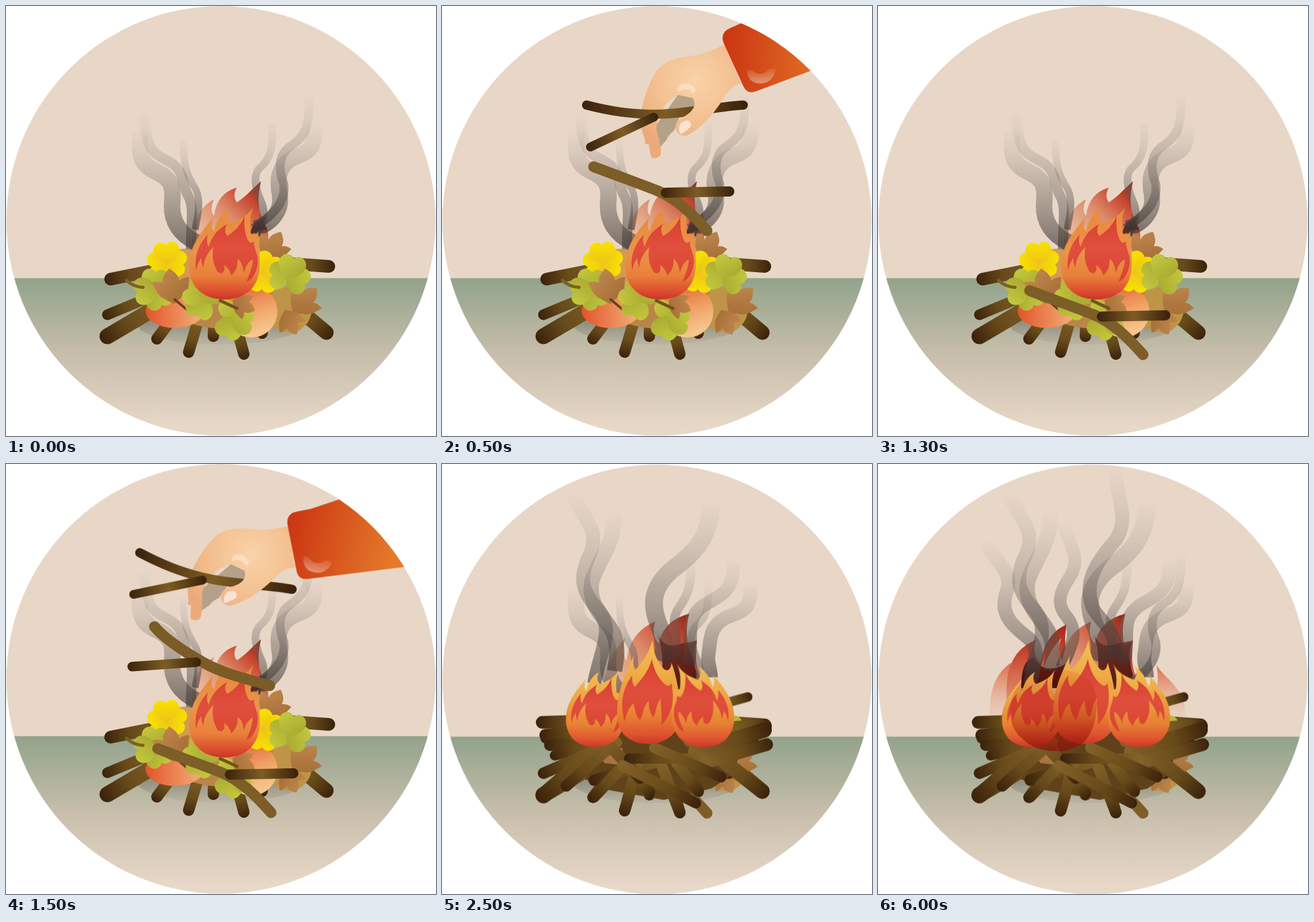
These frames come from a looping animation (678x677 px, 8000 ms). An HTML page:

```html
<!DOCTYPE html>
<html lang="en">
<head>
<meta charset="utf-8">
<title>Campfire</title>
<style>
html, body { margin: 0; width: 100%; height: 100%; overflow: hidden; background: #fff; }
svg { display: block; width: 678px; height: 677px; }
.scene, .early, .late, .mid, .first, .last, .hand, .s1, .s2 { animation: 8s step-end infinite; }
.scene { animation-name: nudge; }
.early { animation-name: early; }
.first { animation-name: first; }
.late { animation-name: late; }
.mid { animation-name: mid; }
.last { animation-name: last; }
.hand { animation-name: hand; }
.s1 { animation-name: drop1; }
.s2 { animation-name: drop2; }
@keyframes nudge { 0% { transform: none } 25%, 100% { transform: translateY(.8px) } }
@keyframes early { 0% { opacity: 1 } 31.25%, 100% { opacity: 0 } }
@keyframes first { 0% { opacity: 1 } 37.5%, 100% { opacity: 0 } }
@keyframes late { 0% { opacity: 0 } 31.25%, 100% { opacity: 1 } }
@keyframes mid { 0% { opacity: 1 } 31.25% { opacity: 0 } 37.5%, 100% { opacity: 1 } }
@keyframes last { 0% { opacity: 0 } 37.5%, 100% { opacity: 1 } }
@keyframes hand {
  0% { opacity: 0; transform: none }
  6.25% { opacity: 1; transform: none }
  12.5% { opacity: 0; transform: none }
  18.75% { opacity: 1; transform: translate(331px, 168.5px) rotate(13.5deg) translate(-351.5px, -156px) }
  25%, 100% { opacity: 0; transform: none }
}
@keyframes drop1 {
  0% { opacity: 0; transform: none }
  6.25% { opacity: 1; transform: translateY(-195px) }
  12.5%, 100% { opacity: 1; transform: none }
}
@keyframes drop2 {
  0% { opacity: 0; transform: none }
  18.75% { opacity: 1; transform: translateY(-136px) }
  25%, 100% { opacity: 1; transform: none }
}
.smoke path { fill: none; stroke: url(#haze); stroke-linejoin: round; }
</style>
</head>
<body>
<svg viewBox="0 0 678 677">
<defs>
  <clipPath id="disc"><circle cx="339" cy="338.3" r="338.3"/></clipPath>
  <linearGradient id="ground" x2="0" y2="1"><stop stop-color="#92a38b"/><stop offset=".5" stop-color="#c9bfac"/><stop offset=".95" stop-color="#e8d8c8"/></linearGradient>
  <linearGradient id="shade" x2="0" y2="1"><stop offset=".5" stop-color="#77756a" stop-opacity=".9"/><stop offset="1" stop-color="#b5aa9a" stop-opacity=".7"/></linearGradient>
  <linearGradient id="bark"><stop stop-color="#3a210b"/><stop offset=".4" stop-color="#674a1a"/><stop offset="1" stop-color="#836329"/></linearGradient>
  <linearGradient id="twig"><stop stop-color="#3a210b"/><stop offset=".5" stop-color="#7d5c24"/><stop offset="1" stop-color="#38200a"/></linearGradient>
  <linearGradient id="held" gradientUnits="userSpaceOnUse" x1="221" x2="482"><stop stop-color="#3a210b"/><stop offset=".5" stop-color="#7d5c24"/><stop offset="1" stop-color="#38200a"/></linearGradient>
  <linearGradient id="warm" x2="0" y2="1"><stop stop-color="#e9873c"/><stop offset=".5" stop-color="#eb9348"/><stop offset=".75" stop-color="#e9813a"/><stop offset=".92" stop-color="#dc4c2e"/><stop offset="1" stop-color="#c9352a"/></linearGradient>
  <linearGradient id="gold" x2="0" y2="1"><stop stop-color="#f3c155"/><stop offset=".35" stop-color="#efaa46"/><stop offset=".72" stop-color="#e88233"/><stop offset=".9" stop-color="#df5630"/><stop offset="1" stop-color="#cd382a"/></linearGradient>
  <linearGradient id="red" x2="0" y2="1"><stop stop-color="#d83f31"/><stop offset=".5" stop-color="#e04f3d"/><stop offset="1" stop-color="#d8452f"/></linearGradient>
  <linearGradient id="back" x1="1" y1="0" x2=".25" y2=".75"><stop stop-color="#701711"/><stop offset=".32" stop-color="#c94831"/><stop offset=".62" stop-color="#dd8a6a"/><stop offset="1" stop-color="#e6b79b"/></linearGradient>
  <linearGradient id="ember" x2="0" y2="1"><stop stop-color="#a3271c"/><stop offset=".35" stop-color="#cc4a33"/><stop offset="1" stop-color="#e3a27f" stop-opacity=".8"/></linearGradient>
  <linearGradient id="pale" x2="0" y2="1"><stop stop-color="#de6a48"/><stop offset="1" stop-color="#e8c3a8" stop-opacity=".3"/></linearGradient>
  <linearGradient id="char" x2="0" y2="1"><stop stop-color="#7a1c14"/><stop offset="1" stop-color="#2e0d06"/></linearGradient>
  <linearGradient id="veil" x2="0" y2="1"><stop stop-color="#b0200e" stop-opacity=".1"/><stop offset=".6" stop-color="#b0200e" stop-opacity=".4"/><stop offset="1" stop-color="#8c120a" stop-opacity=".75"/></linearGradient>
  <linearGradient id="haze" x2="0" y2="1"><stop stop-color="#8b8079" stop-opacity="0"/><stop offset=".2" stop-color="#857a74" stop-opacity=".14"/><stop offset=".55" stop-color="#6f6661" stop-opacity=".42"/><stop offset="1" stop-color="#3d3532" stop-opacity=".6"/></linearGradient>
  <linearGradient id="yellow" x2="0" y2="1"><stop stop-color="#f8e200"/><stop offset="1" stop-color="#eec31a"/></linearGradient>
  <linearGradient id="lime" gradientUnits="userSpaceOnUse" x1="-30" y1="-30" x2="30" y2="30"><stop stop-color="#c9cf3f"/><stop offset="1" stop-color="#96922b"/></linearGradient>
  <linearGradient id="tan" x2="1" y2="1"><stop stop-color="#c58d50"/><stop offset="1" stop-color="#9f6833"/></linearGradient>
  <linearGradient id="rust"><stop stop-color="#e4532c"/><stop offset="1" stop-color="#f2b479"/></linearGradient>
  <linearGradient id="peach" x2=".3" y2="1"><stop stop-color="#e2602f"/><stop offset=".6" stop-color="#f1a468"/><stop offset="1" stop-color="#f6c58d"/></linearGradient>
  <linearGradient id="sleeve" gradientUnits="userSpaceOnUse" x1="445" y1="60" x2="620" y2="60"><stop stop-color="#cb3512"/><stop offset="1" stop-color="#e57a2a"/></linearGradient>
  <radialGradient id="skin" gradientUnits="userSpaceOnUse" cx="400" cy="118" r="115"><stop stop-color="#f8d3a9"/><stop offset=".5" stop-color="#f4c293"/><stop offset="1" stop-color="#eca97a"/></radialGradient>
  <linearGradient id="shine" x2="0" y2="1"><stop stop-color="#fff" stop-opacity=".08"/><stop offset="1" stop-color="#fff" stop-opacity=".4"/></linearGradient>

  <path id="petal" d="M0 4C-19-1-27-18-18-28C-12-34-3-32 0-27C3-32 12-34 18-28C27-18 19-1 0 4Z"/>
  <g id="clover"><use href="#petal" transform="rotate(-105)"/><use href="#petal" transform="rotate(105)"/><use href="#petal"/></g>
  <path id="leaf" fill="url(#tan)" d="M0-38C9-30 15-24 14-14C20-18 25-19 33-18C29-4 26 8 15 14C9 20 3 22 0 25C-3 22-9 20-15 14C-26 8-29-4-33-18C-25-19-20-18-14-14C-15-24-9-30 0-38Z"/>
  <g id="flame">
    <path d="M344 462C309 462 288 440 289 408C290 380 303 360 327 333C323 343 324 350 328 355C331 341 338 327 352 319C347 329 349 337 354 342C371 336 386 327 392 311C385 327 384 340 386 358C390 361 394 360 398 356C396 370 401 385 400 410C399 442 378 462 344 462Z"/>
    <path fill="url(#red)" d="M300 417C296 394 304 375 318 360C316 369 317 375 320 379C324 364 331 354 349 343C344 350 345 357 349 362C360 355 371 345 376 330C375 348 377 362 383 371C386 374 389 373 391 370C390 382 398 388 397 404C396 418 388 433 379 434C384 422 389 411 389 399C380 404 377 413 375 420C374 410 371 402 365 398C366 408 363 418 355 424C353 416 349 411 344 408C346 418 341 424 334 419C327 408 324 395 327 379C319 388 312 398 311 412C308 404 308 400 308 397C303 403 301 410 300 417Z"/>
  </g>
</defs>

<g class="scene"><g clip-path="url(#disc)">
  <rect width="678" height="677" fill="#e8d7c7"/>
  <rect y="428.5" width="678" height="249" fill="url(#ground)"/>
  <ellipse cx="338" cy="500" rx="132" ry="33" fill="url(#shade)" opacity=".6"/>

  <g class="early">
    <path fill="url(#back)" d="M294 385C290 350 300 320 328 304C322 318 324 326 328 330C332 306 343 292 364 286C358 296 360 304 364 309C376 302 386 290 402 276C396 300 398 320 404 335L412 350C416 365 412 385 405 400Z"/>
    <path fill="url(#char)" opacity=".75" d="M385 360C386 345 396 337 411 331C405 340 407 347 412 353C402 350 396 356 385 360Z"/>
  </g>
  <g class="late">
    <g class="last">
      <path fill="url(#pale)" d="M176 395C175 350 190 325 210 312C206 330 210 345 225 350L230 400Z"/>
      <path fill="url(#pale)" d="M439 315C447 332 474 345 482 375L486 397L430 397C440 362 444 340 439 315Z"/>
      <path fill="url(#ember)" d="M204 380C197 310 222 288 249 276C244 295 248 305 256 312C262 280 275 262 297 252C294 275 294 290 300 310L300 400Z"/>
    </g>
    <path fill="url(#back)" d="M250 400C248 350 262 300 289 273C284 292 287 302 291 310C294 280 308 260 336 247C331 265 335 275 342 282C347 258 362 242 390 235C384 255 386 270 388 285L402 278C398 300 400 320 412 350L400 400Z"/>
    <path fill="url(#char)" opacity=".85" d="M340 268C346 280 356 288 370 284C382 280 392 280 402 277C394 290 394 305 402 330L396 360L345 350C350 310 347 285 340 268Z"/>
    <path class="last" fill="url(#char)" d="M226 352C226 320 232 308 245 303C256 325 275 325 296 314L288 352Z"/>
  </g>

  <g class="smoke">
    <g class="first">
      <path stroke-width="26" d="M212 195C208 240 215 250 235 260C262 272 264 285 262 310C260 340 275 360 300 372"/>
      <path stroke-width="11" d="M279 207C280 262 288 268 300 290C308 310 302 330 298 352"/>
      <path stroke-width="12" d="M420 180C421 225 418 240 400 255C388 268 394 290 404 312C410 330 405 345 395 360"/>
    </g>
    <path class="early" stroke-width="16" d="M218 168C220 225 232 232 252 242C285 258 275 280 288 300C298 320 290 350 292 385"/>
    <path class="mid" stroke-width="14" d="M478 140C479 195 470 205 450 220C425 235 432 265 438 280C442 310 420 330 390 350"/>
    <path class="early" stroke-width="25" d="M486 185C488 225 480 228 455 238C425 252 428 280 432 300C435 325 415 345 392 350"/>
    <path class="late" stroke-width="22" d="M486 185C488 225 480 228 455 238C418 252 424 280 420 300C418 312 424 322 424 335"/>
  </g>
  <g class="smoke late">
    <path stroke-width="22" d="M206 45C222 88 250 100 234 140C214 180 222 200 244 226C274 258 250 290 240 345"/>
    <path stroke-width="24" d="M272 75C272 130 248 145 236 185C230 225 258 240 270 266C280 290 274 310 272 325"/>
    <path stroke-width="28" d="M424 58C424 118 396 140 360 168C325 200 332 230 344 258C352 280 350 298 346 310"/>
    <path stroke-width="14" d="M393 150C393 200 384 210 372 228C358 250 374 270 370 308"/>
    <path stroke-width="21" d="M459 152C462 200 440 205 412 222C380 246 398 270 388 315"/>
    <g class="last">
      <path stroke-width="22" d="M170 120C186 160 214 165 203 200C190 235 212 254 238 274C256 292 246 312 240 330"/>
      <path stroke-width="20" d="M292 90C302 130 322 146 302 178C280 210 286 226 298 240C320 268 300 292 290 320"/>
      <path stroke-width="22" d="M374 5C376 55 398 85 374 120C338 160 326 190 338 224C350 250 380 260 372 300"/>
    </g>
  </g>

  <g id="base"></g>
  <g>
    <ellipse cx="345" cy="468" rx="88" ry="40" fill="#b98548"/>
    <circle cx="388" cy="388" r="25" fill="#d59a5c"/>
    <use href="#leaf" transform="translate(419 383) rotate(28) scale(.82)"/>
    <circle cx="446" cy="478" r="36" fill="#bf9448"/>
    <use href="#leaf" transform="translate(467 467) rotate(45) scale(.86)"/>
    <use href="#leaf" transform="translate(447 494) rotate(155) scale(.68)"/>
    <circle cx="282" cy="410" r="28" fill="#d49a54"/>
    <ellipse cx="266" cy="480" rx="46" ry="27" fill="url(#rust)"/>
    <circle cx="387" cy="481" r="41" fill="url(#peach)"/>
    <use href="#clover" fill="url(#yellow)" transform="translate(254 402) rotate(-4) scale(.95)"/>
    <use href="#clover" fill="url(#lime)" transform="translate(234 446) rotate(-100)"/>
    <path d="M190 432Q200 442 216 443" fill="none" stroke="#7c6220" stroke-width="5" stroke-linecap="round"/>
    <use href="#leaf" transform="translate(262 447) rotate(-8) scale(.9)"/>
    <path d="M266 462L285 478" stroke="#6b4218" stroke-width="4" stroke-linecap="round"/>
    <use href="#clover" fill="url(#yellow)" transform="translate(407 419) rotate(82)"/>
    <use href="#clover" fill="url(#lime)" transform="translate(447 424) rotate(15)"/>
    <use href="#clover" fill="url(#lime)" transform="translate(311 461) rotate(-55)"/>
    <use href="#clover" fill="url(#lime)" transform="translate(358 493) rotate(100)"/>
    <use href="#leaf" transform="translate(371 470) rotate(115) scale(.62)"/>
    <path d="M338 464L364 476" stroke="#74511d" stroke-width="5" stroke-linecap="round"/>
  </g>
  <use class="early" href="#flame" fill="url(#warm)"/>

  <g class="s2">
    <path d="M234 392C250 411 280 431 312 449S380 474 416 485" fill="none" stroke="#7b5b26" stroke-width="17" stroke-linecap="round"/>
    <g data-twig="199 455 300 448 15"></g>
  </g>
  <g class="s1">
    <path d="M239 448C270 460 310 474 340 486S395 523 418 549" fill="none" stroke="#7d5d28" stroke-width="17" stroke-linecap="round"/>
    <g data-twig="353 489 453 487 16"></g>
  </g>

  <g class="late">
    <path fill="#5f4219" d="M195 400L440 400L440 440L475 445L455 490L425 510L350 528L260 512L225 495L240 450Z"/>
    <path fill="#a97440" d="M246 452L284 446L290 474L256 470Z"/>
    <g id="pile"></g>
    <use href="#flame" fill="url(#gold)" transform="translate(-43 63.5) scale(.825)"/>
    <g>
      <path fill="url(#gold)" d="M325 440C295 440 275 422 276 390C277 360 284 338 303 300C300 311 302 318 305 323C316 312 327 296 332 276C333 297 340 312 350 322C356 327 361 322 362 312C370 335 375 360 376 390C376 422 355 440 325 440Z"/>
      <path fill="url(#red)" d="M288 405C280 375 285 352 300 332C299 340 301 346 304 350C315 338 326 325 331 306C334 325 343 340 353 347C357 350 360 348 362 344C364 360 366 375 360 388C357 398 352 404 346 410C348 395 344 380 345 368C337 378 338 392 333 398C327 390 326 380 326 372C316 382 318 395 312 402C305 395 304 385 302 376C293 384 291 394 288 405Z"/>
    </g>
    <path class="last" fill="url(#veil)" d="M208 385C210 350 235 330 262 322C285 322 318 322 338 345C350 375 346 412 326 436C306 455 262 456 238 440C216 425 208 410 208 385Z"/>
    <use href="#flame" fill="url(#gold)" transform="translate(715.5 36.5) scale(-.882 .884)"/>
  </g>

  <g class="hand">
    <path fill="#b5a189" d="M336 190L372 140L400 140L398 160Q384 166 374 176L366 196Q356 204 354 211L344 222Z"/>
    <path fill="url(#skin)" d="M448 60C428 68 414 76 396 78C362 82 346 90 336 106C323 128 313 160 313 182C314 200 322 208 320 217L326 218C328 226 328 234 331 239Q342 241 345 233C346 215 338 202 338 190C342 170 352 150 372 140L400 146L470 122Z"/>
    <path d="M228 156C270 167 310 172 350 170S440 158 475 156" fill="none" stroke="url(#held)" stroke-width="14.5" stroke-linecap="round"/>
    <g data-twig="234 222 334 175 14"></g>
    <path fill="url(#skin)" d="M472 121C452 126 446 145 434 160C418 182 402 196 386 204Q372 206 368 192Q368 182 378 176C394 168 402 158 396 146C392 138 378 138 366 142C380 112 420 90 450 90Z"/>
    <path fill="#f8e4d4" d="M374 190Q376 181 388 180Q394 184 392 190Q384 198 376 202Q373 197 374 190Z"/>
    <path fill="#fff" opacity=".32" d="M371 130C376 119 392 119 399 130Q400 136 395 137Q387 126 374 135Q370 135 371 130Z"/>
    <path fill="url(#sleeve)" d="M474 26L454 35Q438 42 444 58L475 126Q481 140 496 134L720 50L660-90Z"/>
    <path fill="url(#shine)" d="M481 104Q484 122 503 122Q523 120 526 100Q517 96 511 104Q500 111 490 102Q482 98 481 104Z"/>
  </g>
</g></g>
</svg>
<script>
const NS = "http://www.w3.org/2000/svg";

// Rounded bar from one end to the other, shaded along its length.
function bar(parent, spec, fill) {
  const [x1, y1, x2, y2, w] = spec.trim().split(/\s+/).map(Number);
  const dx = x2 - x1, dy = y2 - y1;
  const rect = document.createElementNS(NS, "rect");
  const angle = Math.atan2(dy, dx) * 180 / Math.PI;
  const attrs = {
    x: -w / 2, y: -w / 2, width: Math.hypot(dx, dy) + w, height: w, rx: w / 2,
    fill: `url(#${fill})`, transform: `translate(${x1} ${y1}) rotate(${angle})`
  };
  for (const k in attrs) rect.setAttribute(k, attrs[k]);
  parent.appendChild(rect);
}

function stack(id, specs) {
  const g = document.getElementById(id);
  specs.split(",").forEach(s => bar(g, s, "bark"));
}

stack("base", `165 430 250 413 20, 160 486 235 455 17, 160 520 245 470 25,
  238 524 265 488 18, 288 545 303 495 18, 327 520 328 490 18, 375 548 362 500 18,
  404 515 395 490 18, 505 514 450 468 23, 509 410 440 405 20`);

stack("pile", `482 366 435 379 15, 158 406 250 403 20, 163 426 260 416 19,
  508 412 462 416 24, 490 436 390 436 18, 178 458 260 440 16, 170 442 275 438 18,
  160 486 250 447 18, 240 497 345 466 18, 327 517 300 482 18, 404 514 370 470 18,
  240 523 290 470 18, 375 548 348 478 18, 288 545 308 470 18, 505 515 425 452 23,
  160 521 255 440 25, 196 506 268 442 18, 312 494 258 436 18, 512 441 420 468 20,
  508 418 400 452 24, 295 463 410 463 16, 440 492 335 446 17, 400 533 285 474 17`);

document.querySelectorAll("[data-twig]").forEach(g => bar(g, g.dataset.twig, "twig"));
</script>
</body>
</html>
```
